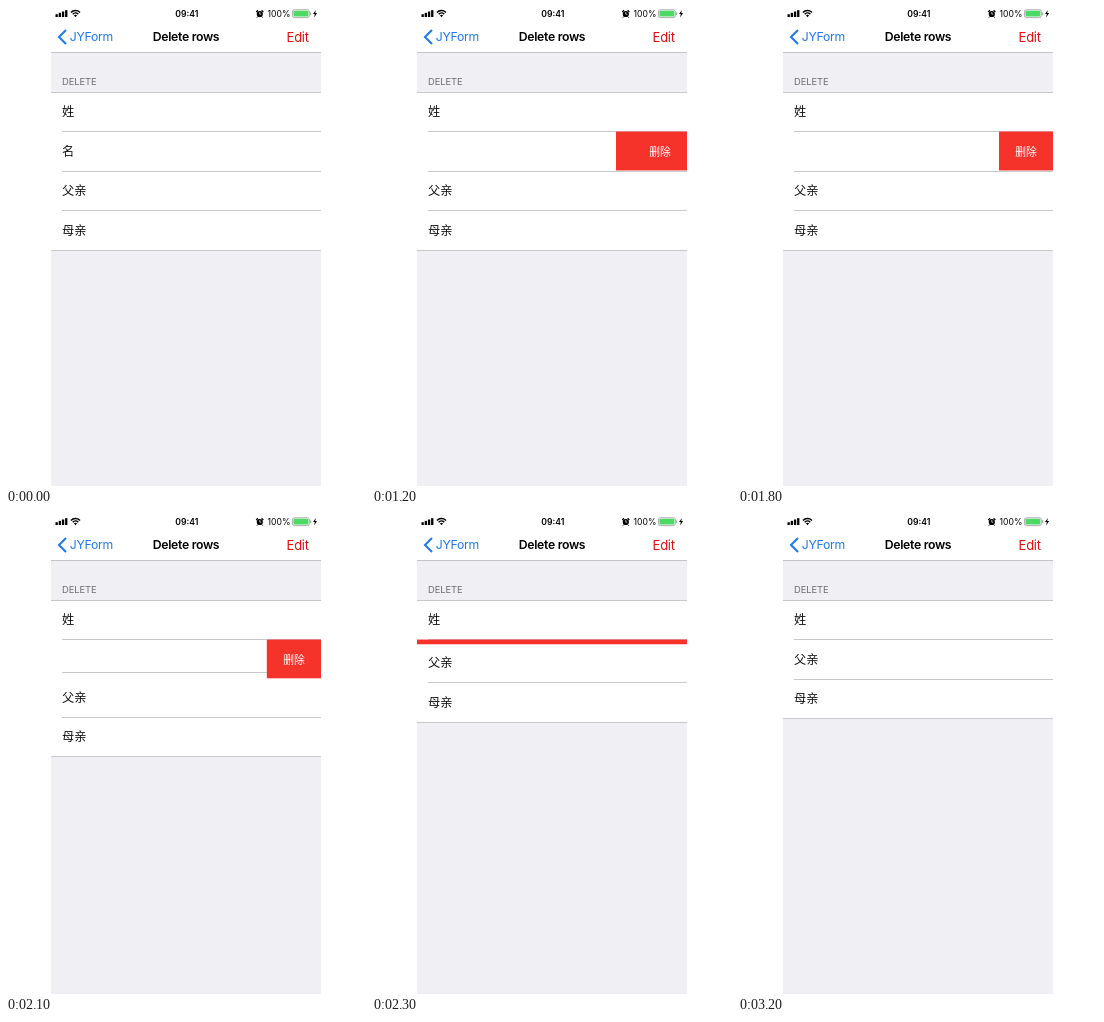
Write an HTML page with a canvas that moves like this. It is 360 by 480 pixels and loops after 3700 ms.

```html
<!DOCTYPE html>
<html lang="en">
<head>
<meta charset="utf-8">
<title>Delete rows</title>
<style>
  html, body { margin: 0; width: 100%; height: 100%; overflow: hidden; background: #fff; }
  canvas { display: block; width: 360px; height: 480px; }
</style>
</head>
<body>
<canvas id="stage"></canvas>
<script>
const canvas = document.getElementById('stage');
const ctx = canvas.getContext('2d');
const ratio = window.devicePixelRatio || 1;
canvas.width = 360 * ratio;
canvas.height = 480 * ratio;

const LOOP = 3700, STEP = 100;
const LEFT = 45, RIGHT = 315, WIDTH = RIGHT - LEFT;
const TOP = 86, ROW = 39.6, SLOT = TOP + ROW;
const LATIN = 'Inter, "Liberation Sans", sans-serif';
const CJK = '"Noto Sans CJK SC", "Noto Sans CJK", sans-serif';
const RED = '#f5332b', LINE = '#c9c8cd', GROUP = '#efeff4';
const SWIPE = [[1000, 0], [1100, 38], [1200, 71], [1300, 72], [1400, 60], [1500, 55], [1600, 54]];

const clamp = v => Math.max(0, Math.min(1, v));
const smooth = v => { v = clamp(v); return v * v * (3 - 2 * v); };

function keyed(keys, t) {
  if (t <= keys[0][0]) return keys[0][1];
  for (let i = 1; i < keys.length; i++) {
    const [t0, v0] = keys[i - 1], [t1, v1] = keys[i];
    if (t <= t1) return v0 + (v1 - v0) * (t - t0) / (t1 - t0);
  }
  return keys[keys.length - 1][1];
}

function box(x, y, w, h, color) {
  ctx.fillStyle = color;
  ctx.fillRect(x, y, w, h);
}

function line(x, y, color = LINE) {
  box(x, Math.floor(y), RIGHT - x, 1, color);
}

function text(str, x, y, font, color, { align = 'left', spacing = 0 } = {}) {
  ctx.font = font;
  ctx.fillStyle = color;
  ctx.textAlign = align;
  ctx.letterSpacing = spacing + 'px';
  ctx.fillText(str, x, y);
}

function polyline(points, color, width) {
  ctx.beginPath();
  points.forEach(([x, y]) => ctx.lineTo(x, y));
  if (width) {
    ctx.strokeStyle = color;
    ctx.lineWidth = width;
    ctx.stroke();
  } else {
    ctx.fillStyle = color;
    ctx.fill();
  }
}

function clipped(x, y, w, h, draw) {
  ctx.save();
  ctx.beginPath();
  ctx.rect(x, y, w, h);
  ctx.clip();
  draw();
  ctx.restore();
}

function drawStatusBar() {
  for (let i = 0; i < 4; i++) {
    const h = 2.8 + i * 1.35;
    box(49.5 + i * 3.2, 11 - h, 2.3, h, '#000');
  }

  ctx.strokeStyle = '#000';
  ctx.lineWidth = 1.5;
  for (const r of [6.2, 3.8]) {
    ctx.beginPath();
    ctx.arc(69.5, 10.8, r, -Math.PI * 0.76, -Math.PI * 0.24);
    ctx.stroke();
  }
  polyline([[69.5, 11.2], [67.9, 9.3], [69.5, 8.7], [71.1, 9.3]], '#000');

  text('09:41', 180.8, 10.7, '600 8.64px ' + LATIN, '#000', { align: 'center' });

  ctx.fillStyle = '#000';
  ctx.beginPath();
  ctx.arc(253.8, 8, 3.1, 0, Math.PI * 2);
  ctx.fill();
  polyline([[250.2, 6], [252, 4.3]], '#000', 1.2);
  polyline([[255.6, 4.3], [257.4, 6]], '#000', 1.2);
  polyline([[251.8, 10.5], [250.9, 11.6]], '#000', 1);
  polyline([[255.8, 10.5], [256.7, 11.6]], '#000', 1);
  polyline([[253.8, 6], [253.8, 8.2], [255.3, 8.2]], '#fff', 0.7);

  text('100%', 261.5, 10.7, '8.64px ' + LATIN, '#000');

  ctx.strokeStyle = '#98989c';
  ctx.lineWidth = 0.8;
  ctx.beginPath();
  ctx.roundRect(286.4, 3.8, 17, 7.8, 2);
  ctx.stroke();
  ctx.fillStyle = '#4cd964';
  ctx.beginPath();
  ctx.roundRect(287.4, 4.8, 15, 5.8, 1);
  ctx.fill();
  box(304.2, 6.4, 1, 2.6, '#98989c');
  polyline([[309.9, 4], [307, 8.1], [308.8, 8.1], [308.1, 11.4], [311.1, 7.1], [309.2, 7.1]], '#000');
}

function drawNavigation() {
  polyline([[60, 24], [53, 31], [60, 38]], '#1f7af3', 2.1);
  text('JYForm', 63.8, 35.2, '12.24px ' + LATIN, '#1f7af3', { spacing: -0.3 });
  text('Delete rows', 180, 35.2, '600 12.24px ' + LATIN, '#000', { align: 'center', spacing: -0.3 });
  text('Edit', 280.6, 35.5, '12.96px ' + LATIN, '#e5100e', { spacing: -0.25 });
  line(LEFT, 46, '#c4c4c8');
}

function drawRow(label, y, x = LEFT) {
  text(label, x + 11, y + 24.1, '12.24px ' + CJK, '#111');
}

function drawSwipedRow(reveal, collapse) {
  const height = ROW * (1 - collapse) + (collapse ? 1.5 : 0);
  clipped(LEFT, SLOT - 0.4, WIDTH, height, () => {
    box(LEFT, SLOT + 0.6, WIDTH, height, '#fff');
    drawRow('名', SLOT, LEFT - reveal);

    const innerLine = SLOT + ROW - collapse * 150;
    if (collapse && innerLine > SLOT) line(LEFT + 11, innerLine);

    const grow = clamp(collapse * 1.2 - 0.05);
    const width = reveal + (WIDTH - reveal) * grow;
    clipped(RIGHT - width, SLOT - 0.4, width, ROW, () => {
      box(LEFT, SLOT - 0.4, WIDTH, ROW, RED);
      text('删除', 288, SLOT + 24, '500 10.8px ' + CJK, '#fff', { align: 'center' });
    });
  });
}

function drawList(t) {
  const reveal = keyed(SWIPE, t);
  const collapse = smooth((t - 2064) / 290);
  const next = SLOT + ROW * (1 - collapse);
  const bottom = next + ROW * 2;

  box(LEFT, 47, WIDTH, 433, GROUP);
  text('DELETE', 56, 79.2, '9.36px ' + LATIN, '#6d6d72', { spacing: -0.05 });

  box(LEFT, TOP, WIDTH, bottom - TOP, '#fff');
  drawRow('姓', TOP);
  drawRow('父亲', next);
  drawRow('母亲', next + ROW);

  line(LEFT, TOP);
  line(LEFT + 11, SLOT);
  if (collapse < 1) line(LEFT + (collapse ? 0 : 11), next);
  line(LEFT + 11, next + ROW);
  line(LEFT, bottom);

  if (collapse < 1) {
    drawSwipedRow(reveal, collapse);
    if (collapse < 0.5) box(LEFT + 11, Math.floor(SLOT), WIDTH - 11 - reveal, 1, LINE);
  } else {
    // The flattened row lingers as a thin line before fading out.
    const fade = clamp((2800 - t) / 300);
    if (fade) line(LEFT, SLOT, `rgba(130, 114, 114, ${fade})`);
  }
}

function render(now) {
  const t = Math.floor((now % LOOP) / STEP) * STEP;
  ctx.setTransform(ratio, 0, 0, ratio, 0, 0);
  box(0, 0, 360, 480, '#fff');
  clipped(LEFT, 0, WIDTH, 480, () => {
    drawList(t);
    drawStatusBar();
    drawNavigation();
  });
}

const start = performance.now();
function tick() {
  render(performance.now() - start);
  requestAnimationFrame(tick);
}
tick();
</script>
</body>
</html>
```
